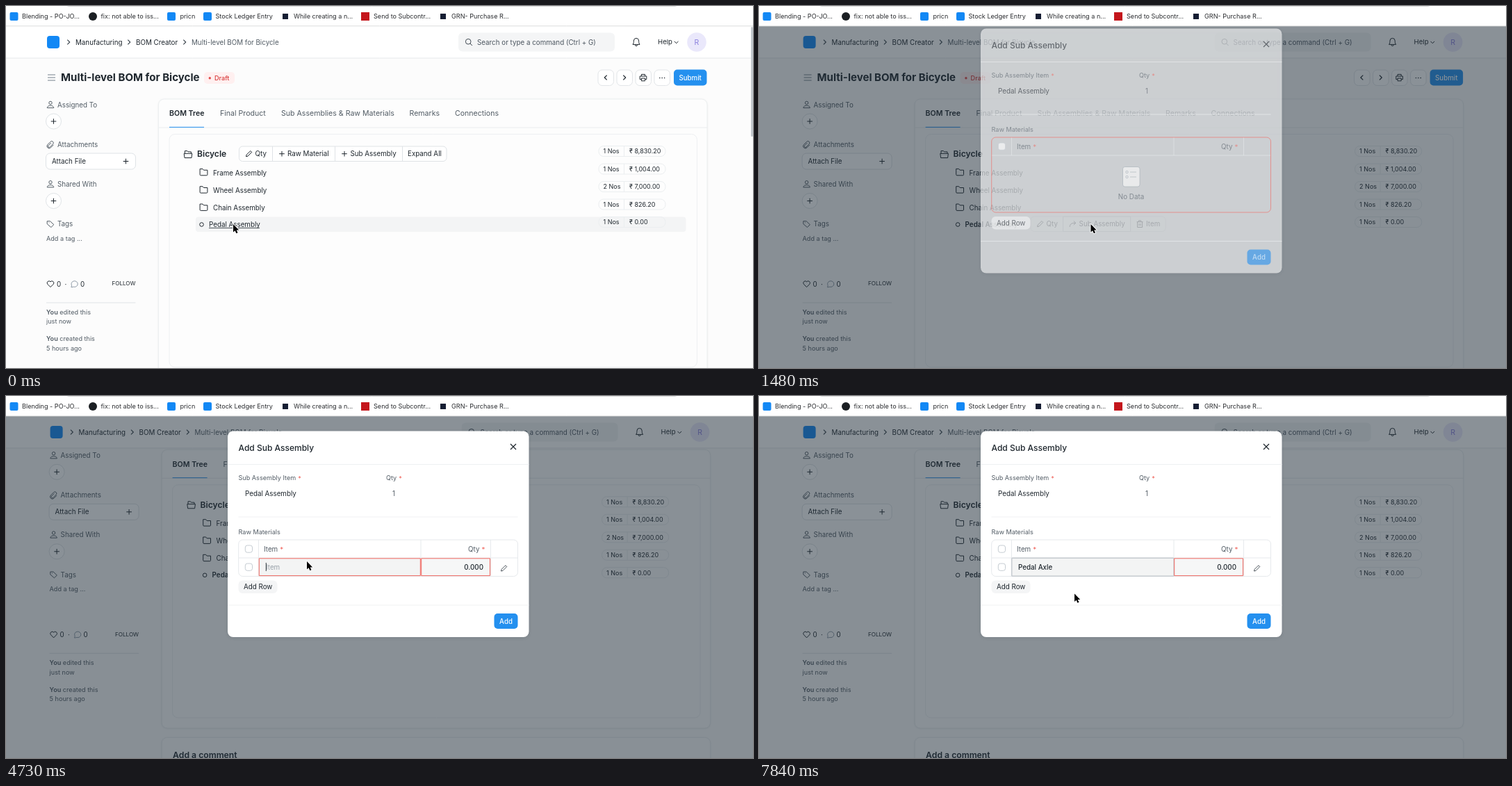
An HTML page with a canvas that plays this animation: 1075x521 px, repeating every 7.99 s.

```html
<!DOCTYPE html>
<html lang="en">
<head>
<meta charset="utf-8">
<title>Add Sub Assembly</title>
<style>
html, body { margin: 0; width: 100%; height: 100%; overflow: hidden; background: #fff; }
canvas { display: block; width: 1075px; height: 521px; }
</style>
</head>
<body>
<canvas id="stage"></canvas>
<script>
const W = 1075, H = 521, LOOP = 7990;
const INK = '#1f272e', MUTED = '#525c65', LINE = '#e6e9ec', BLUE = '#2490ef', RED = '#f0675f', FIELD = '#f3f4f4';
const canvas = document.getElementById('stage');
const ratio = window.devicePixelRatio || 1;
canvas.width = Math.round(W * ratio);
canvas.height = Math.round(H * ratio);
const ctx = canvas.getContext('2d');

// Timing: the screen refreshes only at these moments.
const span = (a, b, n) => Array.from({ length: n }, (_, i) => a + (b - a) * i / (n - 1));
const ticks = [0, 150, ...span(450, 890, 4), ...span(1180, 2220, 8), ...span(2370, 2670, 3),
  2970, 3210, 3390, 3840, 4290, 4730, 4880, ...span(5180, 5780, 5),
  ...span(6380, 7410, 8), ...span(7550, 7840, 3)];
const snap = t => ticks.reduce((last, tick) => tick <= t + 0.01 ? tick : last, 0);

const pointerPath = [[0, 327, 314], [300, 327, 314], [890, 477.5, 314], [1480, 477.5, 314],
  [2070, 398, 329], [2370, 368, 335], [2670, 368, 335], [2970, 424, 257], [3390, 433, 238],
  [6230, 433, 238], [6830, 488, 321], [7410, 488, 321], [7840, 454, 284.5]];

function pointerAt(t) {
  const i = pointerPath.findIndex(k => k[0] >= t);
  if (i <= 0) return (i ? pointerPath[pointerPath.length - 1] : pointerPath[0]).slice(1);
  const [t0, x0, y0] = pointerPath[i - 1], [t1, x1, y1] = pointerPath[i];
  const p = (t - t0) / (t1 - t0), e = p * p * (3 - 2 * p);
  return [x0 + (x1 - x0) * e, y0 + (y1 - y0) * e];
}

// Drawing helpers; text is placed by the middle of its capitals.
function text(s, x, y, size = 9.8, color = INK, weight = 400, align = 'left') {
  ctx.font = `${weight} ${size}px Inter, sans-serif`;
  ctx.textAlign = align;
  ctx.fillStyle = color;
  ctx.fillText(s, x, y + size * 0.36);
  return ctx.measureText(s).width;
}

function box(x, y, w, h, r, fill, stroke, width = 1) {
  ctx.beginPath();
  ctx.roundRect(x, y, w, h, r);
  if (fill) { ctx.fillStyle = fill; ctx.fill(); }
  if (stroke) { ctx.strokeStyle = stroke; ctx.lineWidth = width; ctx.stroke(); }
}

function disc(x, y, r, fill, stroke) {
  box(x - r, y - r, 2 * r, 2 * r, r, fill, stroke);
}

function rule(x1, y1, x2, y2, color = LINE, width = 1) {
  ctx.beginPath();
  ctx.moveTo(x1, y1);
  ctx.lineTo(x2, y2);
  ctx.strokeStyle = color;
  ctx.lineWidth = width;
  ctx.stroke();
}

function shadow(color, blur, dy) {
  ctx.shadowColor = color;
  ctx.shadowBlur = blur * ratio;
  ctx.shadowOffsetY = dy * ratio;
}

const shapes = {
  right: 'M-1.7 -3.4 L1.7 0 L-1.7 3.4',
  left: 'M1.7 -3.4 L-1.7 0 L1.7 3.4',
  down: 'M-2.8 -1.4 L0 1.4 L2.8 -1.4',
  plus: 'M-3.8 0 H3.8 M0 -3.8 V3.8',
  cross: 'M-4 -4 L4 4 M4 -4 L-4 4',
  menu: 'M-5.5 -4 H5.5 M-5.5 0 H5.5 M-5.5 4 H5.5',
  search: 'M3 -0.8 A3.8 3.8 0 1 1 -4.6 -0.8 A3.8 3.8 0 1 1 3 -0.8 M2 2 L5 5',
  bell: 'M-5 3.4 C-3.4 1.6 -3.8 -.5 -3.6 -2 A3.6 3.6 0 0 1 3.6 -2 C3.8 -.5 3.4 1.6 5 3.4 Z M-1.5 3.8 A1.5 1.8 0 0 0 1.5 3.8',
  user: 'M2.2 -2.6 A2.2 2.2 0 1 1 -2.2 -2.6 A2.2 2.2 0 1 1 2.2 -2.6 M-4.8 4.6 C-4.5 .2 4.5 .2 4.8 4.6 Z',
  clip: 'M-4.2 .6 L0 -3.6 A2.3 2.3 0 0 1 3.6 -.4 L-.6 4 A1.6 1.6 0 0 1 -3 1.8 L.8 -2 M-4.2 .6 A3 3 0 0 0 .4 4.8 L4.4 .8',
  tag: 'M-4.8 -4 H-.5 L4.8 1 L.8 4.8 L-4.8 0 Z M-2.4 -1.9 H-1.6',
  heart: 'M0 4.6 L-4.2 .3 A2.6 2.6 0 0 1 0 -3.1 A2.6 2.6 0 0 1 4.2 .3 Z',
  bubble: 'M-4.6 4.8 L-3.9 2.2 A4.6 4.3 0 1 1 -1.2 4.2 Z',
  folder: 'M-5.4 3.6 V-4.6 H-1.5 L0 -2.8 H5.4 V3.6 A1.2 1.2 0 0 1 4.2 4.8 H-4.2 A1.2 1.2 0 0 1 -5.4 3.6 Z',
  opened: 'M-4.6 -1.2 V-5 H-1.2 L0 -3.6 H4.4 V-1.2 M-5.8 -1.2 H5.8 L5 5 H-5 Z',
  printer: 'M-2.6 -2 V-4.6 H2.6 V-2 M-2.6 2.6 H-4.8 V-2 H4.8 V2.6 H2.6 M-2.6 1 H2.6 V4.8 H-2.6 Z',
  pencil: 'M-4 4 L-3.4 1.4 L2.4 -4.2 L4.2 -2.4 L-1.5 3.4 Z',
  share: 'M-4.4 4.2 C-4 0 -2 -1.4 3.8 -1.4 M1.2 -4.2 L4.2 -1.4 L1.2 1.4',
  trash: 'M-4.4 -3 H4.4 M-1.6 -3 V-4.8 H1.6 V-3 M-3.5 -3 V4.8 H3.5 V-3 M-1.1 -.6 V2.6 M1.1 -.6 V2.6'
};
for (const name in shapes) shapes[name] = new Path2D(shapes[name]);

function icon(name, x, y, color = INK, width = 1) {
  ctx.save();
  ctx.translate(x, y);
  ctx.strokeStyle = color;
  ctx.lineWidth = width;
  ctx.lineJoin = 'round';
  ctx.stroke(shapes[name]);
  ctx.restore();
}

function clipTo(x, y, w, h, draw) {
  ctx.save();
  ctx.beginPath();
  ctx.rect(x, y, w, h);
  ctx.clip();
  draw();
  ctx.restore();
}

function bookmarks() {
  box(0, 0, W, 29, 0, '#fff');
  box(85, -12, 883, 12.5, 6, null, '#d8d9da');
  const mark = '#1288f5', navy = '#151d33';
  for (const x of [11.5, 238, 290]) box(x - 6, 9, 12, 12, 2, mark);
  disc(125, 15, 6, '#1b1f23');
  for (const x of [402, 629]) box(x - 4, 11, 8, 8, 0, navy);
  box(511, 9, 12, 12, 0, '#c4161c');
  const labels = [[23, 'Blending - PO-JO...'], [136.5, 'fix: not able to iss...'], [250.5, 'pricn'],
    [301.5, 'Stock Ledger Entry'], [414, 'While creating a n...'], [529, 'Send to Subcontr...'],
    [641, 'GRN- Purchase R...']];
  for (const [x, s] of labels) text(s, x, 15, 9.1, '#2b2d30');
  rule(0, 28.8, W, 28.8, '#dcdddd');
}

function navbar() {
  box(-10, 29, W + 20, 46, 0, '#fff');
  rule(-10, 75, W + 10, 75, LINE);
  box(59, 43, 18, 18, 4, '#1288f5');
  for (const x of [90, 177, 257]) icon('right', x, 52, '#3c464e', 1.1);
  text('Manufacturing', 100, 52);
  text('BOM Creator', 187, 52);
  text('Multi-level BOM for Bicycle', 267, 52, 9.8, MUTED);
  box(651, 38.5, 225, 27, 6, '#f4f5f6');
  icon('search', 666, 52, '#404a52');
  text('Search or type a command (Ctrl + G)', 678, 52, 9.8, '#4c5660');
  icon('bell', 907, 52);
  text('Help', 938, 52, 9.6);
  icon('down', 964.7, 52.3);
  disc(994, 52, 13.8, '#eae8fb');
  text('R', 994, 52, 10.5, '#8b80de', 400, 'center');
}

function heading(scrolled) {
  box(-10, 75.5, W + 20, 57, 0, '#fcfcfc');
  if (scrolled) rule(-10, 132.5, W + 10, 132.5, '#dfe3e6');
  icon('menu', 65.5, 103, '#74808b', 1.1);
  text('Multi-level BOM for Bicycle', 79, 102.5, 15.05, INK, 700);
  box(285, 95, 44, 17, 5, '#fff0f0');
  disc(293.3, 103.7, 1.7, '#e24c4c');
  text('Draft', 300, 103.7, 9.1, '#d93b3b', 500);
  for (const x of [852, 879, 906, 933]) box(x, 92, 22.5, 22.5, 6, '#fff', '#e2e5e8');
  icon('left', 863, 103, INK, 1.2);
  icon('right', 890, 103, INK, 1.2);
  icon('printer', 917, 103);
  for (const x of [940.8, 944.2, 947.6]) disc(x, 103.5, 0.8, INK);
  box(961, 91.5, 47.5, 23, 5, BLUE);
  text('Submit', 984.7, 103.2, 9.7, '#fff', 500, 'center');
}

function sidebar() {
  const groups = [['user', 'Assigned To', 142], ['clip', 'Attachments', 199],
    ['user', 'Shared With', 256.3], ['tag', 'Tags', 313.7]];
  for (const [name, label, y] of groups) {
    icon(name, 64, y, MUTED);
    text(label, 74, y, 9.8, MUTED);
  }
  for (const y of [166, 280.5]) {
    disc(68.5, y, 11, '#fff', '#dfe3e6');
    icon('plus', 68.5, y);
  }
  box(57.5, 212, 129, 23, 6, '#fff', '#dfe3e6');
  text('Attach File', 66, 223.5);
  icon('plus', 172.5, 223.5);
  text('Add a tag ...', 58, 334.5, 9.1, MUTED);
  icon('heart', 64, 400);
  text('0', 73, 400);
  text('·', 84.5, 400);
  icon('bubble', 98.5, 400, '#8d99a6');
  text('0', 107, 400);
  text('FOLLOW', 186.5, 399.5, 8.1, INK, 400, 'right');
  rule(58, 427, 186.5, 427, '#dfe3e6');
  for (const [verb, when, y] of [['edited', 'just now', 440.5], ['created', '5 hours ago', 479]]) {
    const w = text('You', 58, y, 9.1, MUTED, 600);
    text(` ${verb} this`, 58 + w, y, 9.1, MUTED);
    text(when, 58, y + 13.7, 9.1, MUTED);
  }
}

function buttonRow(x, y, right, dividers, items) {
  box(x, y, right - x, 21.5, 5, '#fff', '#dfe3e6');
  for (const d of dividers) rule(d, y, d, y + 21.5, '#dfe3e6');
  for (const [name, ix, label, lx] of items) {
    if (name) icon(name, ix, y + 10.7);
    text(label, lx, y + 10.7);
  }
}

function tree(t) {
  const picked = t >= 150;
  icon('opened', 262, 213.5);
  text('Bicycle', 275, 213, 12.1, INK, 600);
  if (!picked) {
    buttonRow(335.5, 202, 634, [383.5, 473.5, 570.5], [['pencil', 349.5, 'Qty', 358.5],
      ['plus', 397, 'Raw Material', 405], ['plus', 487, 'Sub Assembly', 495.5], ['', 0, 'Expand All', 578]]);
  }
  if (t < 1180) box(273, 303.5, 705.5, 21.5, 4, '#f3f4f5');
  ['Frame', 'Wheel', 'Chain'].forEach((s, i) => {
    icon('folder', 284.5, 239 + i * 25.3);
    text(s + ' Assembly', 298, 240 + i * 25.2);
  });
  disc(281.5, 314.5, 2.8, null, INK);
  text('Pedal Assembly', 292, 314.3, 9.8, INK, picked ? 600 : 400);
  if (t < 590) rule(292, 319.5, picked ? 367 : 365, 319.5, INK, 0.8);
  if (picked) {
    buttonRow(386.5, 303, 580.5, [433, 530], [['pencil', 400, 'Qty', 409],
      ['share', 447, 'Sub Assembly', 456], ['trash', 543.5, 'Item', 552.5]]);
    if (t >= 890) box(433, 303, 97, 21.5, 0, null, '#c3cad0');
  }
  const costs = ['8,830.20', '1,004.00', '7,000.00', '826.20', '0.00'];
  costs.forEach((cost, i) => {
    const y = 209 + i * 25.5;
    box(853, y - 7.5, 96, 15, 7, null, '#ebeef0');
    rule(889.5, y - 7.5, 889.5, y + 7.5, '#ebeef0');
    text(`${i === 2 ? 2 : 1} Nos`, 859.5, y, 9);
    text('₹ ' + cost, 897, y, 9);
  });
}

function card(y, h) {
  ctx.save();
  shadow('rgba(25,39,52,.10)', 3, 0.5);
  box(219.5, y, 789.5, h, 8, '#fdfdfd');
  ctx.restore();
  box(219.5, y, 789.5, h, 8, null, '#e9ecee', 0.8);
}

function content(t) {
  sidebar();
  card(134, 400.7);
  text('BOM Tree', 235, 154.5, 10.6, INK, 600);
  for (const [s, x] of [['Final Product', 308], ['Sub Assemblies & Raw Materials', 396], ['Remarks', 580.5], ['Connections', 646]])
    text(s, x, 154.5, 10.6, MUTED);
  rule(219.5, 175, 1009, 175, '#eaedef');
  rule(235, 174.4, 285, 174.4, BLUE);
  box(235, 184.5, 759.5, 335.3, 8, null, '#eef0f2');
  tree(t);
  card(548.2, 200);
  text('Add a comment', 235.5, 573.8, 12.2, INK, 600);
}

// The page darkens while the dialog opens.
const shadeAt = t => t < 1180 ? 0 : t < 1300 ? 0.2 : t < 1450 ? 0.38 : 0.52;

function page(t) {
  const scroll = t < 2970 ? 0 : t < 3210 ? 2.3 : 56.7;
  const opened = t >= 1450;
  box(0, 29, W, H, 0, '#fcfcfc');
  ctx.save();
  if (opened) ctx.translate(4.6, 0);
  clipTo(-10, 75, W + 20, H, () => {
    ctx.translate(0, -scroll);
    content(t);
  });
  if (t < 3210) heading(scroll > 0);
  navbar();
  ctx.restore();
  box(0, 29, W, H, 0, `rgba(31,44,56,${shadeAt(t)})`);
  if (!opened) {
    box(1072, 29, 3, H, 0, '#fbfbfb');
    box(1072, 30, 3, t < 1180 ? 158 : 153, 1.5, '#c3c8cd');
  }
}

function label(s, x, y, size, color) {
  const w = text(s, x, y, size, color);
  text('*', x + w + 3, y + 0.8, size, RED);
}

const checkbox = y => box(344.3, y - 5.2, 10.2, 10.2, 3, '#fff', '#c5ccd2');

function emptyTable() {
  box(334.7, 207, 401.8, 108, 6, null, RED);
  box(523.5, 249.5, 24.5, 28.5, 3, '#fbfbfb', '#a3adb6');
  for (const y of [257, 264]) {
    disc(529.5, y, 1.7, null, '#a3adb6');
    rule(534, y, 543, y, '#a3adb6');
  }
  text('No Data', 535.5, 292.5, 9.8, MUTED, 400, 'center');
}

function itemRow(t) {
  box(334.7, 207, 401.8, 52.5, 6, null, LINE);
  checkbox(246.3);
  for (const x of [363.5, 597, 697.5]) rule(x, 233, x, 259.5);
  icon('pencil', 716.5, 248, '#3a444c', 0.9);
  if (t < 3840) return text('0.000', 689, 246.3, 9.8, INK, 600, 'right');

  const chosen = t >= 7100;
  if (chosen) box(363.7, 233.3, 233.3, 26, 1, FIELD, '#c6cbd0', 1.5);
  else box(364.3, 233.8, 232, 24.8, 0, FIELD, RED);
  box(597.7, 233.8, 98.8, 24.8, 0, '#f6f7f7', RED);
  text('0.000', 687, 246.3, 9.8, INK, 500, 'right');

  const typed = t < 5180 ? 0 : Math.min(5, 1 + Math.floor((t - 5180) / 150 + 0.01));
  let end = 374;
  if (chosen) end = 373 + text('Pedal Axle', 373, 246.3, 9.8, INK, 500);
  else if (typed) end += text('pedal'.slice(0, typed), 373.5, 246.3);
  else text('Item', 374, 246.3, 9.8, '#98a1a9');
  const blinkOff = (t >= 4290 && t < 4730) || t >= 7550;
  if (!blinkOff) rule(end + 0.3, 240, end + 0.3, 252, INK, 0.9);
}

function dropdown(t) {
  ctx.save();
  shadow('rgba(25,39,52,.25)', 5, 1);
  box(364, 260, 233, 225.5, [0, 0, 4, 4], '#fff');
  ctx.restore();
  clipTo(364, 260, 233, 225.5, () => {
    const hovered = t >= 6800;
    ['Hub', 'Pedal Axle', 'Pedal Body', 'Rim', 'Seat'].forEach((s, i) => {
      const y = 278.8 + i * 48.2;
      if (!i || (hovered && i === 1)) box(369, y - 14.5, 219.5, 43, 4, FIELD);
      text(s, 376, y, 9.9, INK, 700);
      text(s + ', Products', 376, y + 15, 9.1, '#333c44');
    });
    box(591.5, 261, 4.5, 90, 2, '#b8bec4');
  });
}

function modal(t) {
  const filled = t >= 2970, dy = filled ? -55.5 : 0;
  ctx.save();
  if (t < 1600) {
    ctx.globalAlpha = 0.6;
    ctx.translate(0, -18);
  }
  ctx.save();
  shadow('rgba(25,39,52,.12)', 5, 1);
  box(319, 50.5, 433.5, 352 + dy, 8, '#fff');
  ctx.restore();
  text('Add Sub Assembly', 334.5, 74.5, 12, INK, 500);
  icon('cross', 730, 73, INK, 1.2);
  rule(319, 98.5, 752.5, 98.5, '#eef0f2');
  label('Sub Assembly Item', 334.5, 118, 9.1, MUTED);
  label('Qty', 547, 118, 9.1, MUTED);
  text('Pedal Assembly', 344, 140.7);
  text('1', 556, 140.7, 9.8, MUTED);
  rule(334.5, 174, 736.5, 174, '#f0f2f3');
  text('Raw Materials', 334.5, 195.7, 9.1, MUTED);
  rule(334.7, 233, 736.5, 233);
  for (const x of [363.5, 597, 697.5]) rule(x, 207, x, 233);
  checkbox(220.2);
  label('Item', 371, 220.5, 9.8, MUTED);
  label('Qty', 665, 220.5, 9.8, MUTED);
  if (filled) itemRow(t);
  else emptyTable();
  const held = t >= 2200 && !filled;
  box(334.5, 321 + dy, 56, 18.5, 6, held ? '#e6e9eb' : '#f4f5f6');
  text('Add Row', 342, 330.3 + dy);
  rule(319, 356.5 + dy, 752.5, 356.5 + dy, '#f0f2f3');
  box(702.5, 368.5 + dy, 34, 22, 5, BLUE);
  text('Add', 719.5, 379.7 + dy, 9.7, '#fff', 500, 'center');
  ctx.restore();
}

const arrow = new Path2D('M0 0 V11.6 L2.6 9.2 L4.4 13.2 L6.5 12.3 L4.7 8.4 H8.2 Z');

function pointer(t) {
  ctx.save();
  ctx.translate(...pointerAt(t));
  ctx.strokeStyle = '#fff';
  ctx.lineWidth = 1.8;
  ctx.lineJoin = 'round';
  ctx.stroke(arrow);
  ctx.fillStyle = '#000';
  ctx.fill(arrow);
  ctx.restore();
}

function render(now) {
  const t = snap(now % LOOP);
  ctx.setTransform(ratio, 0, 0, ratio, 0, 0);
  page(t);
  if (t >= 1450) modal(t);
  if (t >= 4880 && t < 7100) dropdown(t);
  bookmarks();
  pointer(t);
}

const start = performance.now();
function loop() {
  render(performance.now() - start);
  requestAnimationFrame(loop);
}
loop();
</script>
</body>
</html>
```
